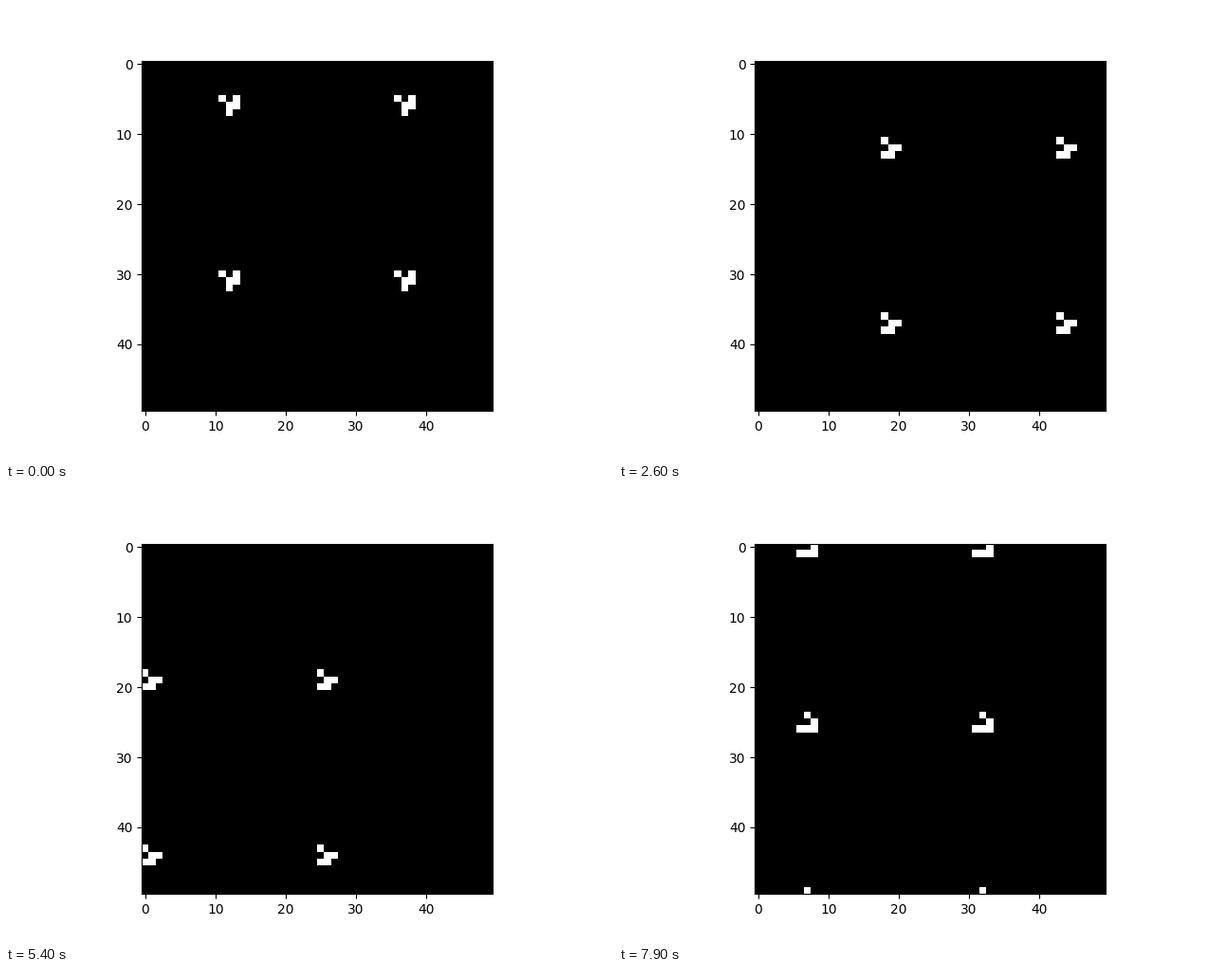
These frames come from a looping animation (640 by 480 pixels, 8 s). A matplotlib script:

```python
import numpy as np
import matplotlib.pyplot as plt
from matplotlib.animation import FuncAnimation

SIZE = 50
FRAMES = 80
INTERVAL = 100

GLIDER = np.array([[1, 0, 1],
                   [0, 1, 1],
                   [0, 1, 0]])


def start_grid():
    grid = np.zeros((SIZE, SIZE), dtype=int)
    for row in (5, 30):
        for col in (11, 36):
            grid[row:row + 3, col:col + 3] = GLIDER
    return grid


def step(grid):
    """One Game of Life generation on a torus."""
    neighbours = sum(np.roll(grid, (dy, dx), axis=(0, 1))
                     for dy in (-1, 0, 1) for dx in (-1, 0, 1)
                     if (dy, dx) != (0, 0))
    alive = (neighbours == 3) | ((grid == 1) & (neighbours == 2))
    return alive.astype(int)


generations = [start_grid()]
while len(generations) < FRAMES:
    generations.append(step(generations[-1]))

fig, ax = plt.subplots(figsize=(6.4, 4.8), dpi=100)
image = ax.imshow(generations[0], cmap="gray", vmin=0, vmax=1,
                  interpolation="nearest")


def update(i):
    image.set_data(generations[i])
    return (image,)


anim = FuncAnimation(fig, update, frames=FRAMES, interval=INTERVAL,
                     repeat=True, repeat_delay=0)
plt.show()
```
